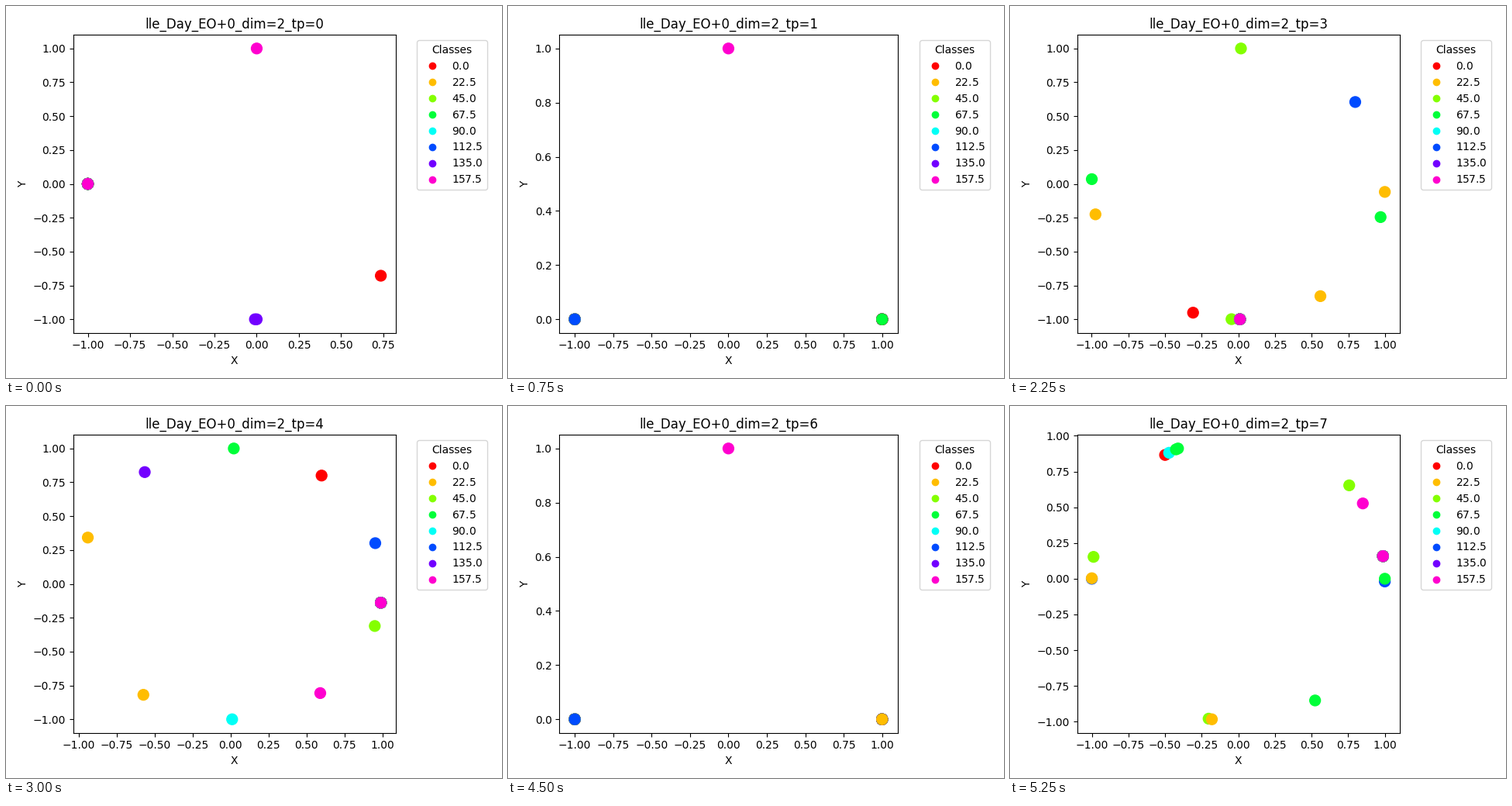
A matplotlib script for the animation above (6000 ms loop, 640 px wide and 480 px high).

```python
import numpy as np
import matplotlib.pyplot as plt
from matplotlib.animation import FuncAnimation

STEP = 22.5  # degrees between neighbouring classes
CLASSES = 8
DEPTH = 5 * CLASSES  # samples that share one spot in a cluster

fig = plt.figure(figsize=(6.4, 4.8), dpi=100)


def cluster(angle, top):
    """Samples of all classes on one spot, ending with class top."""
    return [(angle, (top + 5 * k) % CLASSES) for k in reversed(range(DEPTH))]


def spots(by_class):
    return [(a, kind) for kind, angles in by_class.items() for a in angles]


def arc(first, last, n):
    """Single samples spread evenly along an arc."""
    return [(a, (3 * k + 1) % CLASSES)
            for k, a in enumerate(np.linspace(first, last, n))]


def corners(right):
    """Samples collapsed onto the left, right and top of the circle."""
    return cluster(180, 5) + cluster(0, right) + [(90, 7)]


# Samples lie on the unit circle: (angle in degrees, class) in drawing order.
TIMES = [
    spots({0: [-42.7], 6: [-90.6, -90], 7: [90]}) + cluster(180, 7),
    corners(3),
    arc(-30, 90, 4) + cluster(180, 7),
    spots({0: [-108], 1: [193, -3.4, -56], 2: [89, -92.7],
           3: [178, -14.2], 5: [37.2]}) + cluster(-89.4, 7),
    arc(-125, 160, 9) + cluster(-8, 7),
    spots({1: [-57.4, -76.6], 2: [-24.2], 3: [59.7, -7.8], 4: [155],
           5: [87.2, 76, -17.6], 7: [138.5, 25.3]}) + cluster(-11.4, 7),
    corners(1),
    spots({0: [120], 4: [118.2], 2: [40.8, 171.2, -101.7], 5: [-1.1, 180],
           3: [0, -58.4, 115.2, 114.3], 1: [179.8, -100.4],
           7: [31.8]}) + cluster(9.1, 7),
]


def draw(t):
    fig.clear()
    fig.subplots_adjust(left=0.125, right=0.9, bottom=0.11, top=0.88)
    ax = fig.add_subplot()
    angles, kinds = np.array(TIMES[t]).T
    angles = np.radians(angles)
    dots = ax.scatter(np.cos(angles), np.sin(angles), c=kinds * STEP, s=100,
                      cmap="hsv", vmin=0, vmax=CLASSES * STEP)
    ax.set_title(f"lle_Day_EO+0_dim=2_tp={t}")
    ax.set_xlabel("X")
    ax.set_ylabel("Y")
    ax.legend(*dots.legend_elements(), title="Classes",
              bbox_to_anchor=(1.05, 1), loc="upper left")
    fig.tight_layout()
    return []


anim = FuncAnimation(fig, draw, frames=len(TIMES), interval=750,
                     init_func=lambda: [], repeat=True, repeat_delay=0)
plt.show()
```
